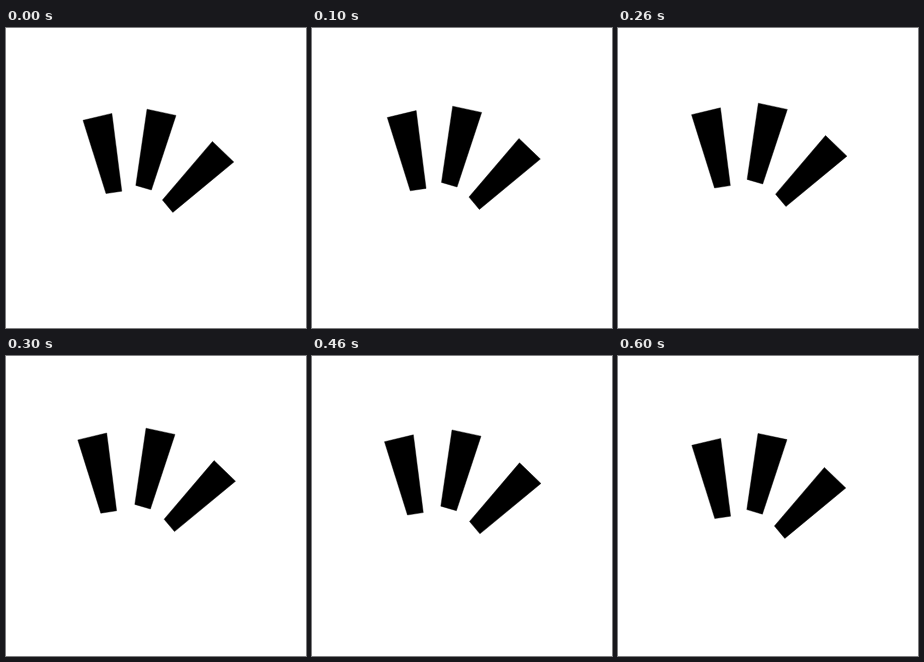
Recreate the animation shown at these times as an HTML page. Size 300 by 300 pixels, loop 0.7 s.

```html
<!DOCTYPE html>
<html lang="en">
<head>
<meta charset="utf-8">
<title>Accent strokes</title>
<style>
  html, body { margin: 0; width: 100%; height: 100%; overflow: hidden; background: #fff; }
  svg { display: block; width: 100%; height: 100%; }
  polygon { stroke: #000; stroke-opacity: 0.4; }
</style>
</head>
<body>
<svg id="stage" viewBox="0 0 300 300"></svg>
<script>
const STEP = 100;
const STEPS = 7;
const PEAK_STEP = 3;

// Each stroke moves from its drawn place to its peak, then part of the way back to its end.
const strokes = [
  { points: "77,92.3 105.9,85.4 115.8,163.2 100,165.6", peak: [-5.2, -8.4], end: [-3.2, -3] },
  { points: "141,81.2 170,87.4 145.4,162 129.8,157.4", peak: [-1, -9], end: [-1, -3.8] },
  { points: "206.4,113.4 227.8,134 166.8,184.4 156.4,172", peak: [1.7, -8.8], end: [0, -2] }
];

const stage = document.getElementById("stage");
for (const stroke of strokes) {
  stroke.node = document.createElementNS("http://www.w3.org/2000/svg", "polygon");
  stroke.node.setAttribute("points", stroke.points);
  stage.append(stroke.node);
}

const mix = (from, to, amount) => from.map((value, i) => value + (to[i] - value) * amount);

function shiftAt(step, { peak, end }) {
  if (step <= PEAK_STEP) return mix([0, 0], peak, step / PEAK_STEP);
  return mix(peak, end, (step - PEAK_STEP) / (STEPS - 1 - PEAK_STEP));
}

function render(time) {
  const step = Math.floor(time / STEP) % STEPS;
  for (const stroke of strokes) {
    stroke.node.setAttribute("transform", `translate(${shiftAt(step, stroke)})`);
  }
}

const start = performance.now();
function tick() {
  render(performance.now() - start);
  requestAnimationFrame(tick);
}
tick();
</script>
</body>
</html>
```
